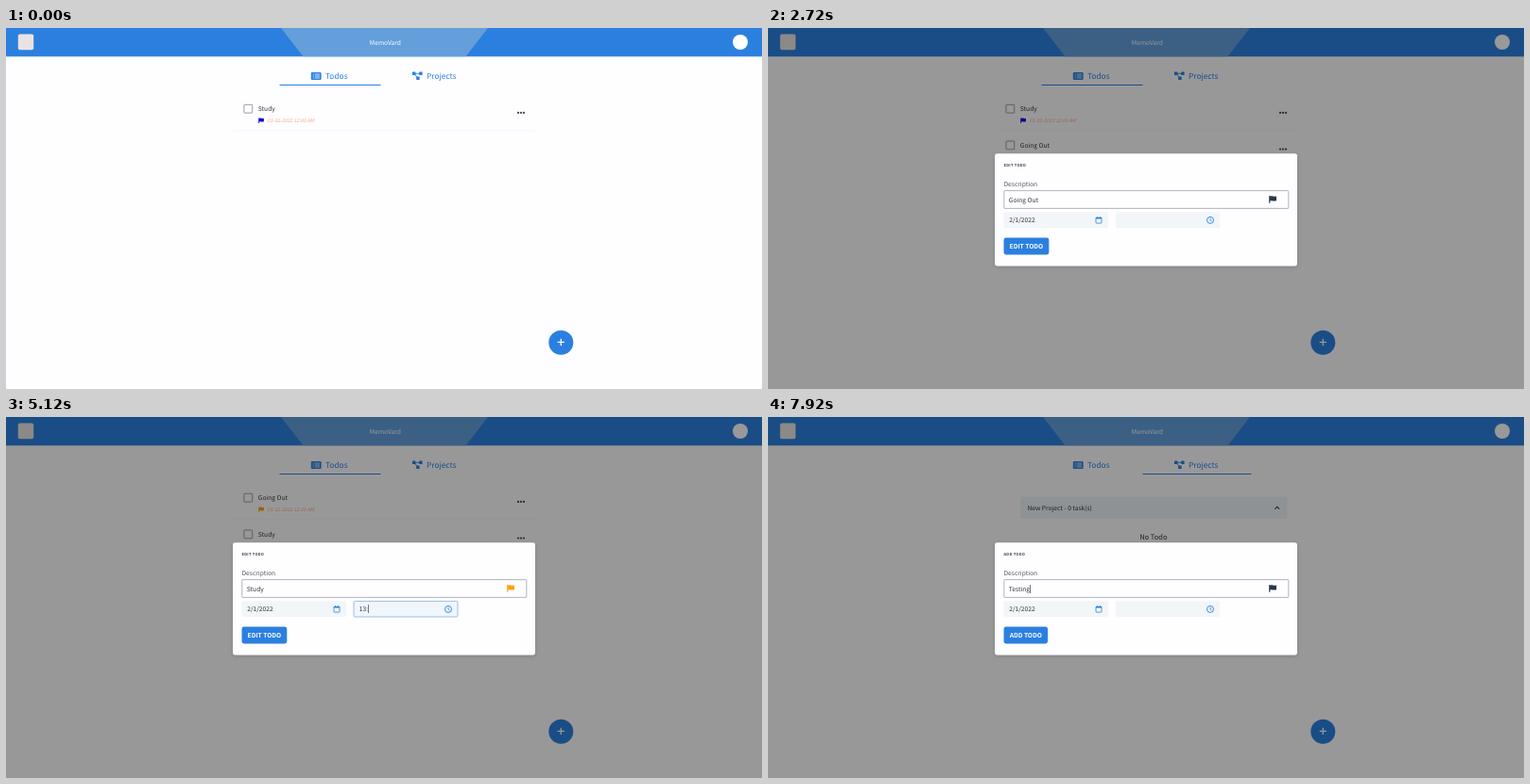
Write an HTML page that moves like this. It is 800x383 px and loops after 8000 ms.

```html
<!DOCTYPE html>
<html lang="en">
<head>
<meta charset="utf-8">
<title>Todo app</title>
<style>
  html, body { margin: 0; width: 100%; height: 100%; overflow: hidden; background: #fefdff; }
  svg { display: block; width: 100vw; height: 100vh; }
  text {
    font-family: "Noto Sans CJK SC", "Noto Sans CJK JP", "Noto Sans", sans-serif;
    font-size: 6.67px;
    text-rendering: geometricPrecision;
    white-space: pre;
  }
</style>
</head>
<body>
<svg id="stage" viewBox="0 0 800 383"></svg>
<script>
const LOOP = 8000, STEP = 80;
const BLUE = '#2b80df', PAGE = '#fefdff', INK = '#333338';
const FLAG = { none: '#2d3748', low: '#0d0de0', mid: '#ffa115', high: '#e60b0b' };
const MIDNIGHT = '01-02-2022 12:00 AM', AFTERNOON = '01-02-2022 01:00 PM';

const stage = document.getElementById('stage');

// Progress from 0 to 1 between two times
const ramp = (t, a, b) => Math.min(1, Math.max(0, (t - a) / (b - a)));
const within = (t, a, b) => t >= a && t < b;
// Last value whose time has been reached
const pick = (t, steps) => steps.reduce((v, [at, next]) => t >= at ? next : v, '');
// Part of a text typed so far
const typed = (t, text, start, gap) =>
  text.slice(0, Math.max(0, Math.floor((t - start) / gap) + 1));

const rect = (x, y, w, h, fill, r = 0, more = '') =>
  `<rect x="${x}" y="${y}" width="${w}" height="${h}" rx="${r}" fill="${fill}" ${more}/>`;
const circle = (x, y, r, fill, more = '') =>
  `<circle cx="${x}" cy="${y}" r="${r}" fill="${fill}" ${more}/>`;
const line = (d, color, w, more = '') =>
  `<path d="${d}" fill="none" stroke="${color}" stroke-width="${w}" ${more}/>`;
const label = (x, y, s, fill = INK, more = '') =>
  `<text x="${x}" y="${y}" fill="${fill}" ${more}>${s}</text>`;
const group = (transform, body, opacity = 1) =>
  `<g transform="${transform}" opacity="${opacity}">${body}</g>`;

const flag = (x, y, k, color) => group(`translate(${x} ${y}) scale(${k})`,
  `<path d="M0 0H.9V.5C2.6-.3 3.6 1 6 .3V4C3.8 4.8 2.6 3.5 .9 4.2V6H0Z" fill="${color}"/>`);

const listIcon = () => {
  let s = rect(322.8, 46.9, 10.8, 8.2, BLUE, 1.1);
  for (const y of [49, 51, 53]) {
    s += circle(325.2, y, .6, PAGE) + line(`M326.8 ${y}H332`, PAGE, .8);
  }
  return s;
};

const treeIcon = (x, y, k, color) => group(`translate(${x} ${y}) scale(${k})`,
  line('M2 1.7H9M2.4 2L5.4 6.4', color, .9) +
  rect(0, 0, 3.4, 3.4, color, .5) + rect(7.2, 0, 3.4, 3.4, color, .5) +
  rect(4.2, 5, 3.4, 3.4, color, .5));

const clipboardIcon = () =>
  rect(583.8, 299.4, 6.8, 8, '#fff', .8) +
  rect(585.5, 298.4, 3.4, 2.2, '#fff', .7) +
  circle(587.2, 299.6, .5, BLUE) +
  line('M585.2 302.6H589.2M585.2 304.1H589.2M585.2 305.6H589.2', BLUE, .5);

function header() {
  return rect(0, 0, 800, 30.3, BLUE) +
    `<path d="M291 0H510L486.5 30.3H314.5Z" fill="#649fdb"/>` +
    rect(12.8, 6.4, 16.4, 16.8, '#e9e3e1', 2) +
    circle(777, 15, 8, '#fff') +
    label(401.4, 17.7, 'MemoVard', '#fff', 'text-anchor="middle"');
}

function tabs(onProjects) {
  const style = 'style="font-size:8.33px;font-weight:500"';
  const [x, w] = onProjects ? [396.5, 115] : [289.5, 107];
  return listIcon() + treeIcon(430, 46.6, 1, BLUE) +
    label(338, 54.2, 'Todos', BLUE, style) +
    label(445, 54.2, 'Projects', BLUE, style) +
    rect(x, 60, w, 1, BLUE);
}

function todo(row, [name, level, due]) {
  const dots = [542, 545, 548].map(x => circle(x, 89.9, 1.15, '#4b4b55')).join('');
  return group(`translate(0 ${row * 38.7})`,
    rect(251.9, 81.3, 8.8, 8.8, 'none', .6, 'stroke="#8b8b90" stroke-width=".85"') +
    label(266.8, 88.2, name) +
    flag(267.2, 95.4, .95, FLAG[level]) +
    label(276.6, 100.2, due, '#f7a679', 'style="font-size:5.2px;font-style:italic"') +
    dots + rect(240, 108.6, 320, .6, '#ededf1'));
}

function todos(t) {
  const study = (level, due) => ['Study', level, due];
  const out = level => ['Going Out', level, MIDNIGHT];
  const list =
    t < 1440 ? [study('low', MIDNIGHT)] :
    t < 3360 ? [study('low', MIDNIGHT), out('none')] :
    t < 6000 ? [out('mid'), study('low', MIDNIGHT)] :
               [out('mid'), study('high', AFTERNOON)];
  return list.map((item, i) => todo(i, item)).join('');
}

function projects(t) {
  const open = ramp(t, 6640, 6800);
  return rect(267, 84.4, 282.5, 23.6, '#edf2f7', 1.5) +
    label(274.4, 99, 'New Project - 0 task(s)', INK, 'font-weight="500"') +
    group(`translate(538.8 96.4) rotate(${180 * open})`,
      line('M-2.3 -1.2L0 1.2L2.3 -1.2', INK, 1.1)) +
    group('translate(0 0)',
      label(407.8, 130, 'No Todo', INK, 'text-anchor="middle" style="font-size:7.5px"'), open);
}

function addButton(t) {
  const items = ramp(t, 0, 240) - ramp(t, 720, 880);
  const turn = 45 * (ramp(t, 0, 240) - ramp(t, 800, 960));
  const item = (y, icon) => group(
    `translate(587.2 ${y}) scale(${items}) translate(-587.2 ${-y})`,
    circle(587.2, y, 10.4, BLUE) + icon, items);
  return (items > 0
      ? item(272.8, treeIcon(582.1, 268.7, .97, '#fff')) + item(303.2, clipboardIcon())
      : '') +
    circle(587.3, 333.8, 13, BLUE) +
    group(`translate(587.3 333.4) rotate(${turn})`, line('M-3.6 0H3.6M0 -3.6V3.6', '#fff', 1.25));
}

const dialogs = [
  {
    verb: 'ADD', open: 400, close: 1360, fade: 160,
    text: t => typed(t, 'Going Out', 720, 60),
    level: () => 'none',
    caret: t => within(t, 720, 1360) ? 'text' : ''
  },
  {
    verb: 'EDIT', open: 2480, close: 3360, fade: 0,
    text: () => 'Going Out',
    level: t => pick(t, [[0, 'none'], [2880, 'low'], [3040, 'mid']])
  },
  {
    verb: 'EDIT', open: 4000, close: 6000, fade: 0,
    text: () => 'Study',
    level: t => pick(t, [[0, 'low'], [4480, 'mid'], [5520, 'high']]),
    time: t => typed(t, '13:00', 4960, 80).slice(0, t < 5120 ? 2 : t < 5200 ? 4 : 5),
    focus: t => within(t, 4640, 5520),
    caret: t => within(t, 4640, 4800) || within(t, 4960, 5520) ? 'time' : ''
  },
  {
    verb: 'ADD', open: 7040, close: LOOP, fade: 0,
    text: t => pick(t, [[7520, 'T'], [7680, 'Te'], [7760, 'Test'], [7840, 'Testi'], [7920, 'Testing']]),
    level: () => 'none',
    caret: t => t >= 7440 ? 'text' : ''
  }
];

function dialog(t, d) {
  const show = ramp(t, d.open, d.open + 160) * (d.fade ? 1 - ramp(t, d.close, d.close + d.fade) : 1);
  const scale = .95 + .05 * show;
  const name = d.verb + ' TODO';
  const width = d.verb === 'ADD' ? 46.5 : 47.8;
  const focus = d.focus && d.focus(t);
  const time = !d.time ? '' : t < 5120 ? typed(t, '13', 4960, 80) : d.time(t).slice(0, t < 5200 ? 4 : 5);
  const clock = circle(468, 203.9, 3.5, 'none', `stroke="${BLUE}" stroke-width=".9"`) +
    line('M468 201.8V204L469.5 204.9', BLUE, .8);
  const calendar = rect(347, 201.3, 6, 5.8, 'none', .6, `stroke="${BLUE}" stroke-width=".8"`) +
    rect(346.8, 201, 6.4, 1.6, BLUE, .4) + line('M348.5 200V201.5M351.5 200V201.5', BLUE, .8);
  const caret = d.caret ? d.caret(t) : '';
  const body =
    rect(240, 133.2, 320, 119.2, PAGE, 2.6, 'filter="url(#shadow)"') +
    label(249.5, 147, name, INK, 'style="font-size:4px;font-weight:700;letter-spacing:.25px"') +
    label(249.5, 167.6, 'Description', '#55555c') +
    rect(249.8, 172.6, 301, 18.8, PAGE, .5, 'stroke="#a3a3a8" stroke-width=".8"') +
    label(254.8, 184.6, d.text(t), INK, 'id="text"') +
    flag(530.2, 178, 1.3, FLAG[d.level(t)]) +
    rect(249.5, 195.2, 110.6, 16.8, '#f2f6f9', 1.4) +
    label(255.2, 206, '2/1/2022') + calendar +
    rect(368, 195.4, 110, 16.6, focus ? '#f0f6fb' : '#f2f6f9', 1.4,
      focus ? 'stroke="#7fb0e4" stroke-width=".8"' : '') +
    label(373.8, 206, time, INK, 'id="time"') + clock +
    rect(249.5, 222.5, width, 18, BLUE, 2.4) +
    label(249.5 + width / 2, 234.1, name, '#fff', 'text-anchor="middle" font-weight="600"') +
    (caret ? rect(0, caret === 'text' ? 178 : 199, .6, 9, '#222', 0, `id="caret" data-for="${caret}"`) : '');
  return rect(0, 0, 800, 383, '#000', 0, `opacity="${.4 * show}"`) +
    group(`translate(400 193) scale(${scale}) translate(-400 -193)`, body, show);
}

const toasts = [
  [1440, 2480, 'Successfully added new todo'],
  [3360, 4400, 'Successfully edited todo'],
  [6000, 7040, 'Successfully edited todo']
];

function toast(t, [start, end, message]) {
  const gone = ramp(t, end - STEP, end + STEP);
  return group(`translate(0 ${gone * 10})`,
    rect(8, 354.6, 153.8, 22.9, '#000', 2.6, 'filter="url(#shadow)"') +
    label(20, 368.6, message, '#fff', 'font-weight="700"') +
    line('M149.1 364.1L152.9 367.9M152.9 364.1L149.1 367.9', '#fff', 1), 1 - gone);
}

function placeCaret() {
  const caret = document.getElementById('caret');
  if (!caret) return;
  const field = document.getElementById(caret.dataset.for);
  const length = field.textContent ? field.getComputedTextLength() : 0;
  caret.setAttribute('x', +field.getAttribute('x') + length);
}

function draw(t) {
  const onProjects = t >= 6400;
  const shadow = `<defs><filter id="shadow" x="-10%" y="-20%" width="120%" height="140%">
    <feDropShadow dx="0" dy="1.5" stdDeviation="2" flood-opacity=".14"/></filter></defs>`;
  stage.innerHTML = shadow + rect(0, 0, 800, 383, PAGE) + header() + tabs(onProjects) +
    (onProjects ? projects(t) : todos(t)) + addButton(t) +
    dialogs.filter(d => within(t, d.open, d.close + d.fade)).map(d => dialog(t, d)).join('') +
    toasts.filter(([a, b]) => within(t, a, b + STEP)).map(m => toast(t, m)).join('');
  placeCaret();
}

let start, last = -1;
function tick(now) {
  start ??= now;
  const t = Math.floor(((now - start) % LOOP) / STEP) * STEP;
  if (t !== last) draw(last = t);
  requestAnimationFrame(tick);
}
draw(0);
requestAnimationFrame(tick);
</script>
</body>
</html>
```
